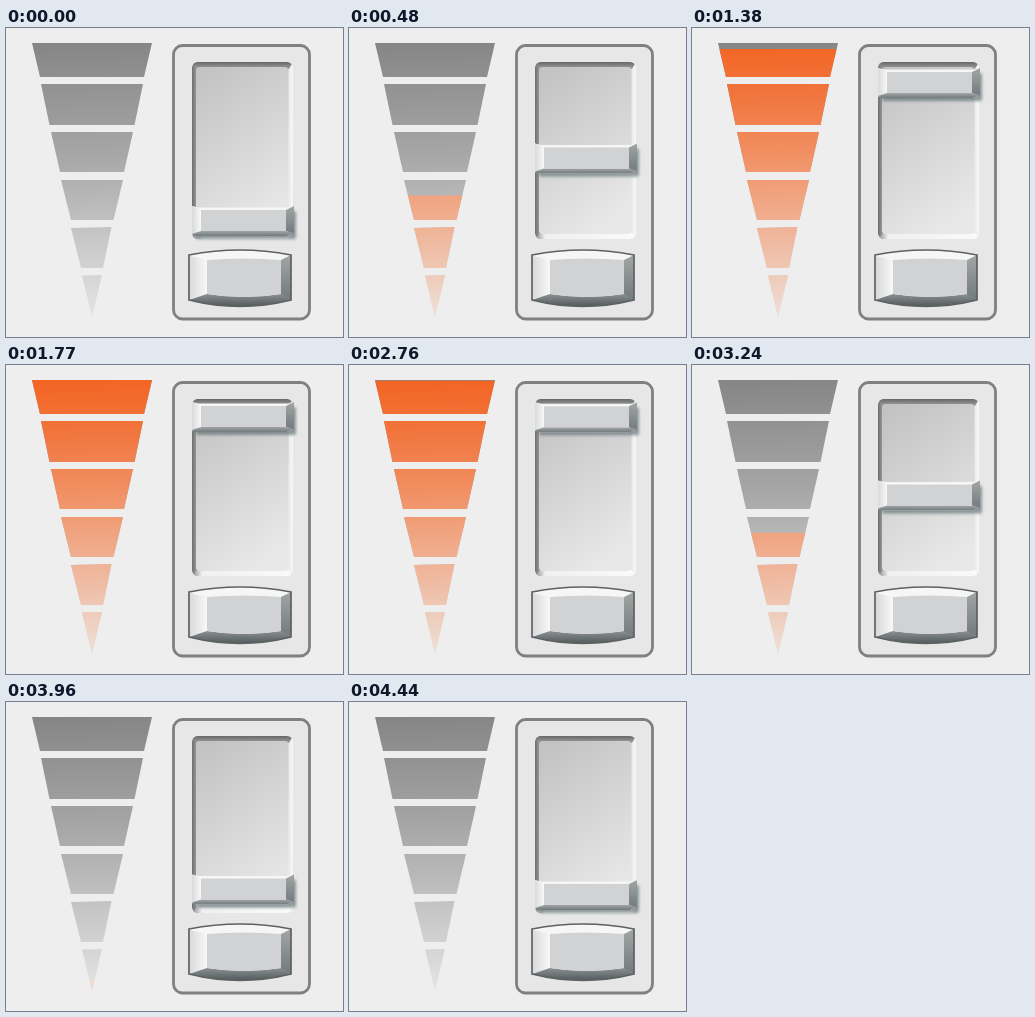
Recreate the animation shown at these times as an HTML page. Size 337 px wide and 309 px high, loop 5.4 s.

```html
<!DOCTYPE html>
<html lang="en">
<head>
<meta charset="utf-8">
<title>Level slider</title>
<style>
  html, body { margin: 0; width: 100%; height: 100%; overflow: hidden; background: #eee; }
  svg { display: block; width: 100%; height: 100%; }
</style>
</head>
<body>
<svg viewBox="0 0 337 309">
  <defs>
    <linearGradient id="gray" gradientUnits="userSpaceOnUse" x1="82" y1="15" x2="90" y2="289">
      <stop offset="0" stop-color="#868686"/>
      <stop offset=".4" stop-color="#a6a6a6"/>
      <stop offset=".75" stop-color="#cbcbcb"/>
      <stop offset="1" stop-color="#e4e4e4"/>
    </linearGradient>
    <linearGradient id="orange" gradientUnits="userSpaceOnUse" x1="82" y1="15" x2="90" y2="289">
      <stop offset="0" stop-color="#f36523"/>
      <stop offset=".2" stop-color="#f1763f"/>
      <stop offset=".4" stop-color="#f18f62"/>
      <stop offset=".75" stop-color="#efbda5"/>
      <stop offset="1" stop-color="#eee0d8"/>
    </linearGradient>
    <linearGradient id="well" x1=".2" y1="0" x2=".6" y2="1">
      <stop offset="0" stop-color="#c3c3c3"/>
      <stop offset="1" stop-color="#e8e8e8"/>
    </linearGradient>
    <linearGradient id="rim" gradientUnits="userSpaceOnUse" x1="186" y1="122" x2="287" y2="122">
      <stop offset="0" stop-color="#6c6e6e"/>
      <stop offset=".05" stop-color="#a0a0a0"/>
      <stop offset=".94" stop-color="#e4e4e4"/>
      <stop offset="1" stop-color="#f8f8f8"/>
    </linearGradient>
    <linearGradient id="rimTop" x1="0" y1="0" x2="0" y2="1">
      <stop offset="0" stop-color="#666868"/>
      <stop offset="1" stop-color="#a2a2a2"/>
    </linearGradient>
    <linearGradient id="rimBottom" x1="0" y1="0" x2="1" y2="0">
      <stop offset="0" stop-color="#8a8a8a"/>
      <stop offset=".1" stop-color="#f0f0f0"/>
      <stop offset="1" stop-color="#fafafa"/>
    </linearGradient>
    <linearGradient id="side" x1="0" y1="0" x2="1" y2="0">
      <stop offset="0" stop-color="#d9dadb"/>
      <stop offset="1" stop-color="#f8f8f8"/>
    </linearGradient>
    <linearGradient id="dark" x1="0" y1="0" x2="0" y2="1">
      <stop offset="0" stop-color="#a1a5a6"/>
      <stop offset="1" stop-color="#737a7b"/>
    </linearGradient>
    <linearGradient id="base" x1="0" y1="0" x2="0" y2="1">
      <stop offset="0" stop-color="#8b9192"/>
      <stop offset="1" stop-color="#535a5b"/>
    </linearGradient>
    <filter id="blur" x="-20%" y="-50%" width="140%" height="200%">
      <feGaussianBlur stdDeviation="1.8"/>
    </filter>
    <clipPath id="slot"><rect x="186" y="34" width="101" height="177" rx="6"/></clipPath>
    <clipPath id="level"><rect id="fill" x="20" width="132" height="300"/></clipPath>
    <path id="cone" d="M26 15H146L138 49H34Z M35 56H137L128.500 97H43.500Z M45 104H127L118 144H54Z M55 152H117L107.500 192H65Z M65 200L105.500 199L97 240H75Z M76 247.500L96 247L86 289Z"/>
  </defs>

  <rect width="337" height="309" fill="#eee"/>
  <use href="#cone" fill="url(#gray)"/>
  <use href="#cone" fill="url(#orange)" clip-path="url(#level)"/>

  <rect x="167.500" y="17.500" width="136" height="273.500" rx="9" fill="#e7e7e7" stroke="#808080" stroke-width="2.800"/>

  <g clip-path="url(#slot)">
    <rect x="186" y="34" width="101" height="177" fill="url(#rim)"/>
    <path d="M186 34H287L283 41H190Z" fill="url(#rimTop)"/>
    <path d="M186 211L191 205H283L287 211Z" fill="url(#rimBottom)"/>
    <rect x="190" y="39" width="92.500" height="167" rx="4" fill="url(#well)"/>
  </g>

  <g id="handle">
    <rect x="190" y="5" width="100" height="28" rx="2" fill="#59696c" opacity=".65" filter="url(#blur)"/>
    <path d="M186 0L192 1.500H282L288 0V27L281 30H190L186 28Z" fill="#f6f6f6"/>
    <path d="M186 0L195 4V25L186 29Z" fill="url(#side)"/>
    <path d="M288 0L280 4V25L288 28Z" fill="url(#dark)"/>
    <path d="M186 28L195 25H280L288 27L281 30H189Z" fill="url(#dark)"/>
    <rect x="195" y="4" width="85" height="21" fill="#d1d2d4"/>
  </g>

  <path d="M183 227Q234 217 285 227V272Q234 285 183 272Z" fill="#f6f6f6"/>
  <path d="M184 228L201 232V267L184 271Z" fill="url(#side)"/>
  <path d="M285 227L275 232V267L285 272Z" fill="url(#dark)"/>
  <path d="M183 272L201 266Q238 272 275 266L285 272Q234 285 183 272Z" fill="url(#base)"/>
  <path d="M201 232Q238 229 275 232V266Q238 272 201 266Z" fill="#d1d2d4"/>
  <path d="M183 227Q234 217 285 227V272Q234 285 183 272Z" fill="none" stroke="#5d6162" stroke-width="1.700"/>
</svg>
<script>
  const LOOP = 5400, MOVE = 1800, DOWN = 2700;
  const handle = document.getElementById('handle');
  const fill = document.getElementById('fill');

  // cubic-bezier(.42, 0, 0, 1), solved by bisection
  function ease(x) {
    if (x <= 0) return 0;
    if (x >= 1) return 1;
    let lo = 0, hi = 1;
    for (let i = 0; i < 24; i++) {
      const s = (lo + hi) / 2;
      if (1.26 * s * (1 - s) ** 2 + s ** 3 < x) lo = s; else hi = s;
    }
    return lo * lo * (3 - 2 * lo);
  }

  function draw(now) {
    const t = now % LOOP;
    const amount = t < DOWN ? ease(t / MOVE) : 1 - ease((t - DOWN) / MOVE);
    handle.setAttribute('transform', `translate(0 ${178 - 141 * amount})`);
    fill.setAttribute('y', 289 - 274 * amount);
  }

  const start = performance.now();
  function tick() {
    draw(performance.now() - start);
    requestAnimationFrame(tick);
  }
  tick();
</script>
</body>
</html>
```
